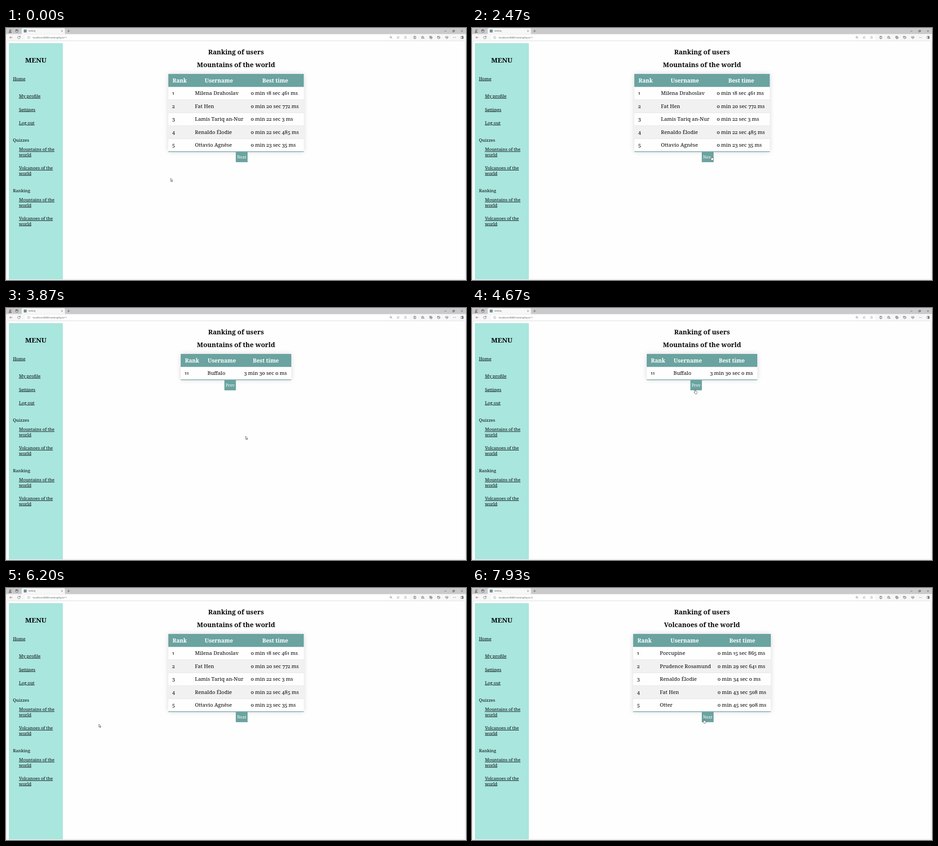
Recreate the animation shown at these times as an HTML page. Size 1011 by 554 pixels, loop 8000 ms.

```html
<!DOCTYPE html>
<html lang="en">
<head>
<meta charset="utf-8">
<title>ranking</title>
<style>
  html, body { margin: 0; width: 100%; height: 100%; overflow: hidden; background: #f7f7f7; }
  svg { display: block; width: 1011px; height: 554px; }
  .page text { font-family: "Noto Serif", serif; font-variant-numeric: oldstyle-nums proportional-nums; fill: #050505; }
  .page .cell { font-size: 11.4px; }
  .page .head { font-size: 12.1px; font-weight: 700; fill: #fff; text-anchor: middle; }
  .page .title { font-size: 14.5px; font-weight: 700; text-anchor: middle; }
  .page .menu { font-size: 15px; font-weight: 700; text-anchor: middle; }
  .page .side { font-size: 9.65px; }
  .page .link { text-decoration: underline; }
  .page .btn { font-size: 9.1px; fill: #fff; text-anchor: middle; }
  .ui { font-family: "Open Sans", sans-serif; fill: #555; }
  .icon { fill: none; stroke: #999; stroke-width: .65; stroke-linecap: round; stroke-linejoin: round; }
  .dark { stroke: #444; }
</style>
</head>
<body>
<svg viewBox="0 0 1011 554" xmlns="http://www.w3.org/2000/svg">
  <defs>
    <filter id="soft" x="-20%" y="-60%" width="140%" height="220%"><feGaussianBlur stdDeviation="5.8"/></filter>
  </defs>

  <!-- browser frame -->
  <rect width="1011" height="554" fill="#f7f7f7"/>
  <rect width="1011" height="13.3" fill="#cac9cb"/>
  <path d="M32 13.5q2.5 0 2.5-2.5V3q0-2.5 2.5-2.5h90q2.5 0 2.5 2.5v8q0 2.5 2.5 2.5z" fill="#f7f7f7"/>
  <circle cx="9" cy="5" r="1.8" fill="#85705f"/>
  <path d="M5.8 10.5q0-3.4 3.2-3.4t3.2 3.4z" fill="#85705f"/>
  <circle cx="12" cy="4" r="1.1" fill="#a98e6c"/>
  <g class="icon dark">
    <rect x="21.3" y="4" width="5.2" height="5.2" rx="1"/>
    <path d="M21.3 5h5.2M23 4v1.4" stroke-width="1.2"/>
    <path d="M121.6 5.2l2.8 2.8m0-2.8l-2.8 2.8M135 6.6h5M137.5 4.1v5"/>
    <path d="M963.8 6.8h3.8M1000.3 4.9l3.6 3.6m0-3.6l-3.6 3.6"/>
    <path d="M982 5.8h2.8v2.8h-2.8zM983 5.8v-1h2.8v2.8h-1"/>
    <path d="M13.8 20.8H8.4m2.4-2.5l-2.5 2.5 2.5 2.5"/>
    <path d="M30.9 19.4a2.9 2.9 0 1 0 .4 1.8M31.2 17.7v2h-2"/>
  </g>
  <rect x="39" y="3.4" width="6.4" height="6.4" fill="#6f8f8f"/>
  <text class="ui" x="49" y="8.4" font-size="4.5">ranking</text>
  <rect x="42" y="15.3" width="844" height="11" rx="2.6" fill="#fff"/>
  <text class="ui" id="url" x="58.6" y="22.8" font-size="5.3"></text>
  <g class="icon">
    <circle cx="49.6" cy="20.8" r="2.8"/><path d="M49.6 20.6v1.6M49.6 19.3v.1"/>
    <circle cx="845.6" cy="20.2" r="2.1"/><path d="M847.2 21.8l1.7 1.7M844.7 20.2h1.8M845.6 19.3v1.8"/>
    <path d="M859.4 23.4l2-5 2 5M860.1 21.8h2.6M863.7 18q1 .9 .5 2.2"/>
    <path id="star"/>
    <g class="dark">
      <rect x="896" y="18.4" width="5" height="4.8" rx=".8"/><path d="M898.5 17.8v6"/>
      <path id="favourites"/><path d="M917.8 22.6h1.8"/>
      <rect x="931" y="18" width="4.4" height="4.2" rx=".9"/><path d="M936.5 19.5v3.1q0 1-1 1h-3M933.2 19v2.2M932.1 20.1h2.2"/>
      <circle cx="951" cy="20.8" r="2.8"/><path d="M951 19.2v1.7l1.3.8M948.4 18v1.5h1.5"/>
      <path d="M968.7 23.7l-2.6-2.6q-1-1.4.2-2.4 1.3-.8 2.4.5 1.1-1.3 2.4-.5 1.2 1 .2 2.4zM966.6 21h1.2l.8-1 .9 1.6.6-.6h1"/>
      <path d="M983.3 20.8h.1M985.6 20.8h.1M987.9 20.8h.1" stroke-width="1.1"/>
      <rect x="1000" y="18.3" width="5" height="4.9" rx=".8"/><path d="M1003.6 18.4v4.7" stroke-width="1.8"/>
    </g>
  </g>

  <!-- web page -->
  <g class="page">
    <rect x="1.7" y="28.4" width="1007.6" height="524.4" rx="2.5" fill="#fffeff" stroke="#dedede" stroke-width=".8"/>
    <rect x="6.3" y="33.3" width="118.6" height="519.2" fill="#a8e6de"/>
    <g id="side"></g>
    <text class="title" x="505.5" y="58.3">Ranking of users</text>
    <g id="view"></g>
  </g>

  <g id="cursor" stroke="#333" stroke-width=".7" stroke-linejoin="round" fill="#fff">
    <path id="arrow" d="M.2.2v6.7l1.6-1.4 1.1 2.5 1.1-.5-1.1-2.4h2z"/>
    <path id="hand" d="M-.7 5V.9q0-.8.7-.8t.7.8v2.5l.9.1 1 .2.9.3q1 .3.9 1.3L4.2 7.2 3.5 9.4H0L-2 6.6q-.7-1 0-1.3.6-.2 1.3.7z"/>
  </g>
</svg>

<script>
const $ = id => document.getElementById(id);
const TEAL = '#6aa3a0', TICK = 8000 / 120, ROW = 28.5, TOP = 129.5;

const rect = (x, y, w, h, fill, more = '') =>
  `<rect x="${x}" y="${y}" width="${w}" height="${h}" fill="${fill}" ${more}/>`;
const text = (cls, x, y, s) => `<text class="${cls}" x="${x}" y="${y}">${s}</text>`;

function drawStar(id, cx, cy) {
  let d = '';
  for (let i = 0; i < 10; i++) {
    const r = i % 2 ? 1.4 : 3.1, a = i * Math.PI / 5;
    d += (i ? 'L' : 'M') + (cx + r * Math.sin(a)).toFixed(2) + ' ' + (cy - r * Math.cos(a)).toFixed(2);
  }
  $(id).setAttribute('d', d + 'z');
}
drawStar('star', 878, 20.9);
drawStar('favourites', 915.6, 20.7);

// Sidebar: links are indented, topics wrap onto two lines
const topics = y => [['Mountains of the', y], ['world', y + 11.5], ['Volcanoes of the', y + 40.8], ['world', y + 52.3]];
const items = [['My profile', 153.1], ['Settings', 182.5], ['Log out', 211.9], ...topics(270.3), ...topics(381.2)];
$('side').innerHTML =
  text('menu', 65.5, 76.3, 'MENU') +
  text('side link', 15.2, 114.7, 'Home') +
  text('side', 15.2, 249.6, 'Quizzes') +
  text('side', 15.2, 360.5, 'Ranking') +
  items.map(([s, y]) => text('side link', 28.4, y, s)).join('');

const time = (m, s, ms) => `${m} min ${s} sec ${ms} ms`;
// box: left and right edge; cols: text starts; heads: header centres
const views = [
  { quiz: 1, first: 1, box: [356.7, 654.5], cols: [365.3, 415.3, 538], heads: [381.7, 467.8, 591.8], nav: ['Next'],
    rows: [['Milena Drahoslav', time(0, 18, 461)], ['Fat Hen', time(0, 20, 772)], ['Lamis Tariq an-Nur', time(0, 22, 3)],
      ['Renaldo Élodie', time(0, 22, 485)], ['Ottavio Agnēse', time(0, 23, 35)]] },
  { quiz: 1, first: 6, box: [354.5, 656.5], cols: [363.3, 413.3, 540.2], heads: [379.6, 468, 594], nav: ['Prev', 'Next'],
    rows: [['Tarek Felicity', time(0, 23, 242)], ['Badger', time(0, 24, 676)], ['Porcupine', time(0, 31, 624)],
      ['Jamilah Rewi', time(0, 31, 631)], ['Prudence Rosamund', time(1, 43, 91)]] },
  { quiz: 1, first: 11, box: [384, 627], cols: [392.8, 442.7, 523.3], heads: [409, 474.3, 571], nav: ['Prev'],
    rows: [['Buffalo', time(3, 30, 0)]] },
  { quiz: 2, first: 1, box: [354.2, 656.8], cols: [362.8, 412.8, 539.8], heads: [379.2, 467.5, 594], nav: ['Next'],
    rows: [['Porcupine', time(0, 15, 865)], ['Prudence Rosamund', time(0, 29, 641)], ['Renaldo Élodie', time(0, 34, 0)],
      ['Fat Hen', time(0, 43, 508)], ['Otter', time(0, 45, 908)]] }
];
const buttons = { Prev: [480, 25.3], Next: [505, 26] };
const bottom = v => TOP + ROW * v.rows.length;

function draw(v) {
  const [l, r] = v.box, w = r - l, end = bottom(v);
  let s = text('title', 505.5, 86.3, (v.quiz === 1 ? 'Mountains' : 'Volcanoes') + ' of the world');
  s += rect(l, 101, w, end - 101, '#000', 'opacity=".15" filter="url(#soft)"');
  s += rect(l, 101, w, end - 101, '#fffeff') + rect(l, 101, w, ROW, TEAL);
  ['Rank', 'Username', 'Best time'].forEach((h, i) => s += text('head', v.heads[i], 119.5, h));
  v.rows.forEach((row, i) => {
    const y = TOP + i * ROW;
    if (i % 2) s += rect(l, y, w, ROW, '#f2f1f2');
    if (i < v.rows.length - 1) s += rect(l, y + ROW - .6, w, .7, '#dcdcdc');
    [v.first + i, ...row].forEach((c, j) => s += text('cell', v.cols[j], y + 17.7, c));
  });
  s += rect(l, end - .9, w, 1.4, TEAL);
  for (const n of v.nav) {
    const [x, bw] = buttons[n];
    s += rect(x, end + .3, bw, 22.7, TEAL) + text('btn', x + bw / 2, end + 15.4, n);
  }
  $('view').innerHTML = s;
  $('url').textContent = 'localhost:8080/ranking?quiz=' + v.quiz;
}

// [tick, view]
const visits = [[0, 0], [41, 1], [58, 2], [74, 1], [85, 0], [106, 3]];

// Pointer path: [tick, x, y, easing into this point]
const smooth = p => p * p * (3 - 2 * p), speedUp = p => p ** 1.6, slowDown = p => 1 - (1 - p) ** 2;
const path = [
  [0, 361.7, 330.2], [22, 361.7, 330.2], [34, 520, 278], [35, 520, 278], [36, 530, 280], [37, 526.5, 281.8],
  [61, 526.5, 281.8], [70, 490.4, 179.3], [75, 490.4, 179.3], [82, 491, 285], [87, 491, 285],
  [93, 204, 299, speedUp], [100, 74, 413.5, slowDown], [103, 72, 418],
  [106, 72, 418], [118, 500, 293.5], [119, 509.7, 287.9]
];

function pointer(k) {
  const i = path.findIndex(p => p[0] >= k);
  if (i < 1) return path[0].slice(1, 3);
  const [a, ax, ay] = path[i - 1], [b, bx, by, ease = smooth] = path[i];
  const p = ease((k - a) / (b - a));
  return [ax + (bx - ax) * p, ay + (by - ay) * p];
}

function overLink(x, y, v) {
  const end = bottom(v);
  return v.nav.some(n => x >= buttons[n][0] && x <= buttons[n][0] + buttons[n][1] && y >= end && y <= end + 23) ||
    items.some(([s, ty]) => x >= 28 && x <= 28 + s.length * 4.8 && y >= ty - 9 && y <= ty + 2.5);
}

let shown = -1;
function render(ms) {
  const k = Math.floor((ms % 8000 + 4) / TICK) % 120;
  const id = visits.filter(s => s[0] <= k).pop()[1], v = views[id];
  if (id !== shown) draw(v), shown = id;
  const [x, y] = pointer(k), hand = overLink(x, y, v);
  $('cursor').setAttribute('transform', `translate(${x.toFixed(2)} ${y.toFixed(2)})`);
  $('hand').style.display = hand ? '' : 'none';
  $('arrow').style.display = hand ? 'none' : '';
}

const start = performance.now();
function loop(now) {
  render(Math.max(0, now - start));
  requestAnimationFrame(loop);
}
render(0);
requestAnimationFrame(loop);
</script>
</body>
</html>
```
